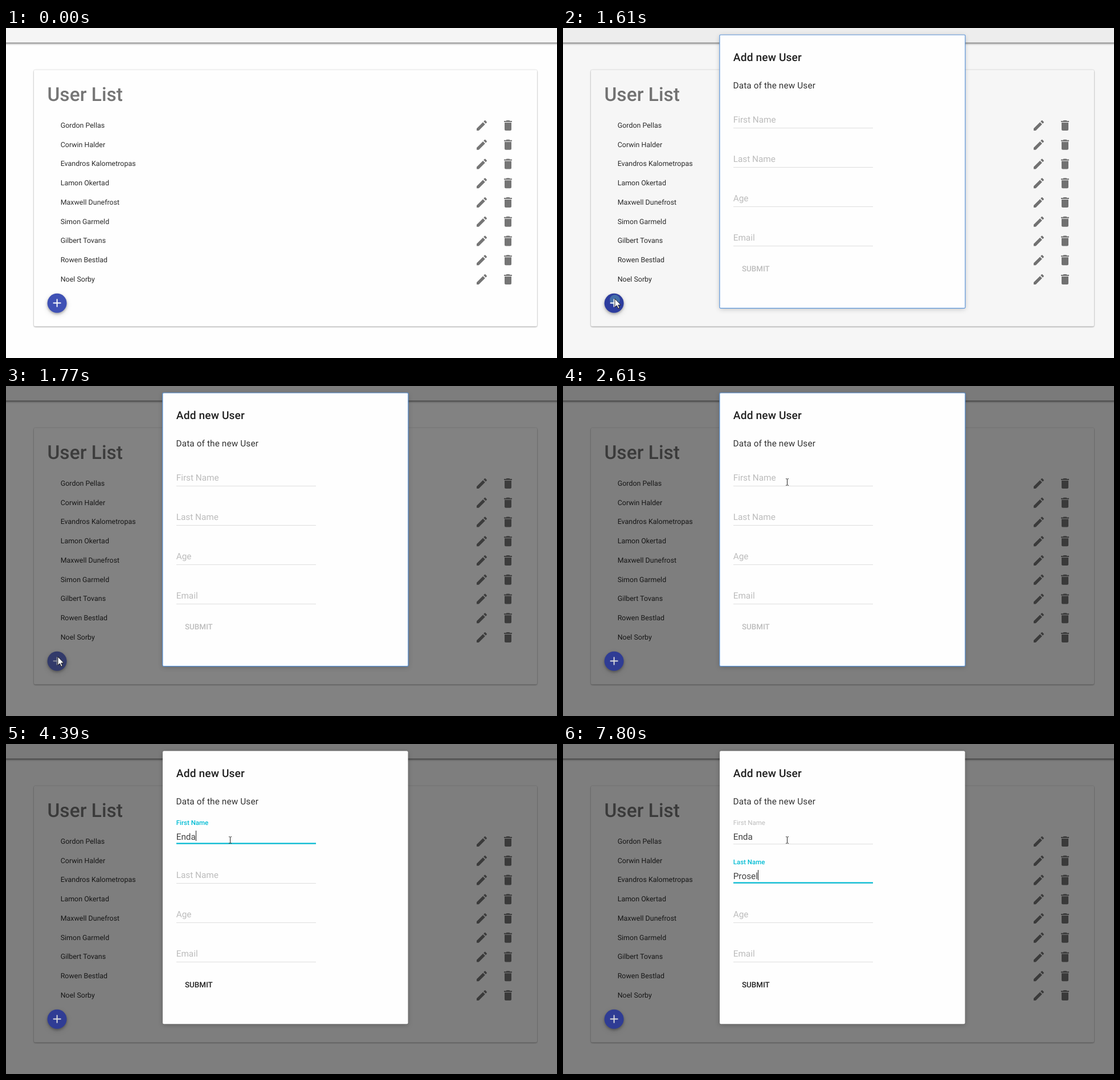
These frames come from a looping animation (967x579 px, 8000 ms). An HTML page:

```html
<!DOCTYPE html>
<html lang="en">
<head>
<meta charset="utf-8">
<title>User List</title>
<style>
  html, body { margin: 0; width: 100%; height: 100%; overflow: hidden; background: #fefefe; }
  svg { display: block; width: 100%; height: 100%; font-family: Roboto, sans-serif; text-rendering: geometricPrecision; }
  .bar { filter: drop-shadow(0 2px 1.5px rgba(0,0,0,.36)) drop-shadow(0 1px 1px rgba(0,0,0,.25)); }
  .card { filter: drop-shadow(0 1px 1px rgba(0,0,0,.3)) drop-shadow(0 0 1px rgba(0,0,0,.16)); }
  .fab { filter: drop-shadow(0 2px 2px rgba(0,0,0,.27)) drop-shadow(0 3px 4px rgba(0,0,0,.14)); }
  .dialog { filter: drop-shadow(0 2px 4px rgba(0,0,0,.22)); }
  .menu { filter: drop-shadow(0 1px 1.5px rgba(0,0,0,.4)); }
  .suggest { font-family: "Open Sans", sans-serif; }
</style>
</head>
<body>
<svg id="stage" viewBox="0 0 967 579" preserveAspectRatio="none"></svg>
<script>
const LOOP = 8000, STEP = 77.2;
const TEAL = '#00bcd4', HINT = '#bcbcbc', INK = '#424242';
const PENCIL = 'M3 17.25V21h3.75L17.81 9.94l-3.75-3.75L3 17.25zM20.71 7.04c.39-.39.39-1.02 0-1.41l-2.34-2.34a1 1 0 0 0-1.41 0l-1.83 1.83 3.75 3.75 1.83-1.83z';
const BIN = 'M6 19c0 1.1.9 2 2 2h8c1.1 0 2-.9 2-2V7H6v12zM19 4h-3.5l-1-1h-5l-1 1H5v2h14V4z';
const USERS = ['Gordon Pellas', 'Corwin Halder', 'Evandros Kalometropas', 'Lamon Okertad', 'Maxwell Dunefrost',
  'Simon Garmeld', 'Gilbert Tovans', 'Rowen Bestlad', 'Noel Sorby'];

const stage = document.getElementById('stage');

function set(node, attrs) {
  for (const key in attrs) node.setAttribute(key, attrs[key]);
  return node;
}
function add(tag, attrs, parent = stage) {
  return parent.appendChild(set(document.createElementNS('http://www.w3.org/2000/svg', tag), attrs));
}
function rect(x, y, width, height, fill, more, parent) {
  return add('rect', { x, y, width, height, fill, ...more }, parent);
}
function text(str, x, y, size, fill, more, parent) {
  const node = add('text', { x, y, 'font-size': size, fill, ...more }, parent);
  node.textContent = str;
  return node;
}
const show = (node, on) => set(node, { visibility: on ? 'visible' : 'hidden' });
const clamp = v => Math.max(0, Math.min(1, v));
const ease = p => 1 - (1 - clamp(p)) ** 3;
const mix = (a, b, p) => a + (b - a) * p;

// Value of the last [time, ...] entry that has started.
const current = (keys, t) => keys.reduce((last, key) => key[0] <= t ? key : last, keys[0]);

// Page
rect(0, 0, 967, 579, '#fefefe');
rect(-10, -20, 987, 45.5, '#f5f5f5', { class: 'bar' });
rect(49, 73.5, 883, 450, '#fefefe', { rx: 2.5, class: 'card' });
text('User List', 72.5, 128, 33.5, '#757575', { 'font-weight': 500 });
USERS.forEach((name, i) => {
  const y = 33.75 * i;
  text(name, 95.7, 174.8 + y, 12.46, '#2b2b2b');
  add('path', { d: PENCIL, fill: '#757575', transform: `translate(823 ${159 + y})` });
  add('path', { d: BIN, fill: '#757575', transform: `translate(869 ${159 + y})` });
});
const backdrop = rect(0, 0, 967, 579, '#000');

// Add button
const fab = add('circle', { cx: 89.6, cy: 482.7, r: 17, class: 'fab' });
const ripple = add('circle', { cx: 91, cy: 477, r: 9, fill: '#5aa0b4', opacity: .5 });
const plus = add('path', { d: 'M82.7 482.5h13.8M89.6 475.6v13.8', 'stroke-width': 1.9 });

// Dialog
const dialog = add('g', {});
rect(275, 12.3, 430.5, 479, '#fefefe', { rx: 2.5, class: 'dialog' }, dialog);
const ring = rect(274.9, 12, 431, 479.6, 'none', { rx: 1.5, stroke: '#5c96db', 'stroke-width': 1.2 }, dialog);
text('Add new User', 298.8, 58, 19.17, '#212121', { 'font-weight': 500, 'letter-spacing': .13 }, dialog);
text('Data of the new User', 298.5, 106, 15.33, '#333', { 'letter-spacing': .13 }, dialog);

function makeField(name, y, from, to, typing, carets) {
  const hint = text(name, 298.7, y, 15.33, HINT, {}, dialog);
  const label = text(name, 298.7, y, 15.33, HINT, {}, dialog);
  const value = text('', 298.7, y + 2, 15.33, INK, {}, dialog);
  rect(299, y + 9, 245, 1, '#dedede', {}, dialog);
  const line = rect(299, y + 7.4, 245, 2.2, TEAL, {}, dialog);
  const caret = rect(0, y - 14, 1, 18, '#222', {}, dialog);

  return (t, q) => {
    const focused = t >= from && t < to;
    const p = t < from ? 0 : ease((q - from + STEP) / 390);
    const typed = t < typing[0][0] ? '' : current(typing, t)[1];
    set(label, {
      y: mix(y, y - 24, p), 'font-size': mix(15.33, 11.5, p),
      fill: focused ? TEAL : HINT, 'font-weight': focused ? 500 : 400
    });
    set(hint, { opacity: typed ? 0 : p });
    value.textContent = typed;
    const half = 122.5 * p;
    set(line, { x: 421.5 - half, width: 2 * half, opacity: t < to ? 1 : 1 - clamp((q - to + STEP) / 300) });
    show(line, t >= from);
    set(caret, { x: Math.round(298.5 + (typed ? value.getComputedTextLength() : 0)) });
    show(caret, focused && current(carets, t)[1]);
  };
}

const fields = [
  makeField('First Name', 166, 2840, 5240,
    [[3690, 'E'], [3840, 'En'], [4160, 'End'], [4390, 'Enda']],
    [[2840, 1], [3230, 0], [3690, 1], [4940, 0]]),
  makeField('Last Name', 235, 5240, LOOP,
    [[5940, 'P'], [6170, 'Po'], [6320, 'Por'], [6550, 'Pors'], [6870, 'Por'], [7020, 'Po'], [7100, 'P'],
     [7250, 'Pr'], [7420, 'Pro'], [7570, 'Pros'], [7720, 'Prose'], [7800, 'Prosel']],
    [[5240, 1], [5700, 0], [5940, 1]])
];
[['Age', 304], ['Email', 373]].forEach(([name, y]) => {
  text(name, 298.7, y, 15.33, HINT, {}, dialog);
  rect(299, y + 9, 245, 1, '#dedede', {}, dialog);
});
const submit = text('SUBMIT', 314, 427, 13.4, HINT, { 'font-weight': 500 }, dialog);

// Autofill menu
const menu = add('g', { class: 'suggest' });
rect(298.6, 196.6, 245.8, 90.6, '#fefefe', { rx: 2, class: 'menu' }, menu);
rect(298.6, 248, 245.8, 39.2, '#f6f8f8', { rx: 2 }, menu);
rect(298.6, 247.6, 245.8, 1, '#e6e8e8', {}, menu);
text('Florencio', 310, 226.3, 12.2, '#333', {}, menu);
text('Florencio', 531.8, 226.3, 12.2, '#707070', { 'text-anchor': 'end' }, menu);
text('Gestionar...', 310, 272, 11.6, '#666', {}, menu);

// Pointers
const arrow = add('path', {
  d: 'M0 0V15L3.4 11.8 5.9 17.3 8.2 16.3 5.8 11H10.5Z',
  fill: '#fff', stroke: '#111', 'stroke-width': .9
});
const beam = add('path', {
  d: 'M391 162.8h1.6l.9.7.9-.7h1.6M393.5 163.5v10M391 174.2h1.6l.9-.7.9.7h1.6',
  fill: 'none', stroke: '#222', 'stroke-width': 1
});

const PATH = [[140, 740, 562], [217, 560, 548], [294, 390, 527], [372, 255, 506], [449, 165, 488], [526, 112, 476],
  [680, 74, 466], [826, 74, 466], [910, 63, 459], [1140, 63, 459], [1380, 91, 475], [1840, 91, 475],
  [1915, 165, 474], [1992, 285, 410], [2200, 360, 270], [2460, 393, 168]];
const SHADE = [[0, 0], [1610, .03], [1690, .405], [1770, .49], [1850, .5]];
const FAB = [[0, '#3f51b5', '#fff'], [1530, '#2d3d9e', '#fff'], [1690, '#3c4476', '#989cae'],
  [1770, '#323a6a', '#858999'], [1930, '#2f3c94', '#dedede']];

function pointAt(q) {
  const i = PATH.findIndex(key => key[0] > q);
  if (i < 1) return PATH[i < 0 ? PATH.length - 1 : 0].slice(1);
  const [a, b] = [PATH[i - 1], PATH[i]];
  const p = (q - a[0]) / (b[0] - a[0]);
  return [mix(a[1], b[1], p), mix(a[2], b[2], p)];
}

function draw(t) {
  const q = 140 + Math.floor((t - 138) / STEP) * STEP;
  set(backdrop, { opacity: current(SHADE, t)[1] });
  const [, face, mark] = current(FAB, t);
  set(fab, { fill: face });
  set(plus, { stroke: mark });
  show(ripple, t >= 1530 && t < 1690);

  const open = t >= 1610;
  set(dialog, { display: open ? 'inline' : 'none' });
  if (open) fields.forEach(update => update(t, q));
  show(ring, t < 2840);
  set(submit, { fill: t < 3770 ? HINT : '#212121' });
  show(menu, t >= 2840 && t < 3770);

  const typing = t >= 2450;
  const [x, y] = pointAt(q);
  set(arrow, { transform: `translate(${x} ${y})` });
  show(arrow, t >= 140 && !typing);
  show(beam, typing);
}

function tick(now) {
  draw(now % LOOP);
  requestAnimationFrame(tick);
}
draw(0);
requestAnimationFrame(tick);
</script>
</body>
</html>
```
